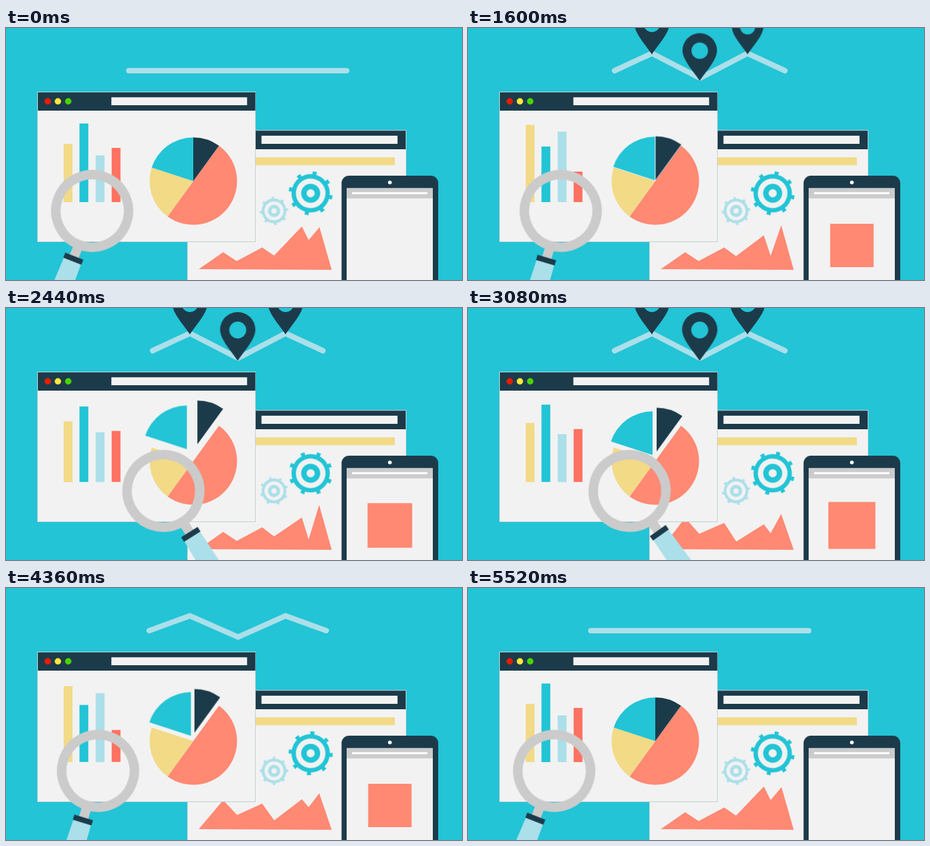
Write an HTML page that moves like this. It is 672 px wide and 372 px high and loops after 5.56 s.

```html
<!DOCTYPE html>
<html lang="en">
<head>
<meta charset="utf-8">
<title>Analytics dashboard</title>
<style>
:root {
  --loop: 5560ms;
  --teal: #22c4d6;
  --dark: #1c3b4a;
  --paper: #f2f2f2;
  --sand: #f2da87;
  --coral: #ff8973;
  --red: #ff7160;
  --ice: #abdfe9;
  --grey: #cbcbcb;
  --cubic: cubic-bezier(.65, 0, .35, 1);
  --quart: cubic-bezier(.76, 0, .24, 1);
  --quad: cubic-bezier(.45, 0, .55, 1);
  --back-out: cubic-bezier(.333, 1.7, .667, 1);
  --back-in: cubic-bezier(.333, 0, .667, -.7);
}
html, body { margin: 0; width: 100%; height: 100%; overflow: hidden; background: var(--teal); }
svg { display: block; width: 672px; height: 372px; }

.teal { fill: var(--teal); }
.dark { fill: var(--dark); }
.paper { fill: var(--paper); }
.sand { fill: var(--sand); }
.coral { fill: var(--coral); }
.red { fill: var(--red); }
.ice { fill: var(--ice); }
.grey { fill: var(--grey); }
.frame { fill: var(--paper); stroke: #c5d0d2; stroke-width: 1; }

.move { animation: var(--loop) var(--cubic) infinite; }

/* Route line */
.route {
  fill: none; stroke: var(--ice); stroke-width: 8;
  stroke-linecap: round; stroke-linejoin: miter;
  animation-name: route;
}
@keyframes route {
  0%, 7.55%, 91.73%, 100% { d: path("M181 63L271 63L342 63L412 63L502 63"); }
  19.42%, 71.94% { d: path("M216 63L271 37.5L342 74L412 37.5L467 63"); }
}

/* Map pins */
.pin { animation-timing-function: linear; }
.pin-a { animation-name: pin-a; }
.pin-b { animation-name: pin-b; }
.pin-c { animation-name: pin-c; }
@keyframes pin-a {
  0%, 79.55%, 100% { transform: scale(0); }
  17.21% { transform: scale(0); animation-timing-function: var(--back-out); }
  28.81% { transform: scale(1); }
  67.95% { transform: scale(1); animation-timing-function: var(--back-in); }
}
@keyframes pin-b {
  0%, 77.34%, 100% { transform: scale(0); }
  19.42% { transform: scale(0); animation-timing-function: var(--back-out); }
  31.03% { transform: scale(1); }
  65.74% { transform: scale(1); animation-timing-function: var(--back-in); }
}
@keyframes pin-c {
  0%, 75.14%, 100% { transform: scale(0); }
  21.64% { transform: scale(0); animation-timing-function: var(--back-out); }
  33.24% { transform: scale(1); }
  63.54% { transform: scale(1); animation-timing-function: var(--back-in); }
}

/* Bars stretch from the baseline; gears swing on the same beat */
.bar { transform-origin: 0 257px; animation-name: bar; }
@keyframes bar {
  0%, 6.12%, 50.72%, 94.96%, 100% { transform: scaleY(1); }
  28.06%, 29.14%, 72.66%, 73.02% { transform: scaleY(var(--to)); }
}
.gear { animation-name: gear; }
@keyframes gear {
  0%, 6.12%, 50.72%, 94.96%, 100% { transform: rotate(var(--from)); }
  28.06%, 29.14%, 72.66%, 73.02% { transform: rotate(var(--to)); }
}

/* Pie slices: --far is the widest gap, --near the resting gap */
.slice { animation-name: slice; }
@keyframes slice {
  0%, 25.18%, 89.21%, 100% { transform: translate(0, 0); }
  40.29% { transform: translate(var(--far-x), var(--far-y)); }
  53.24%, 73.38% { transform: translate(var(--near-x), var(--near-y)); }
}

/* Area graph */
.area { animation-name: area; animation-timing-function: var(--quad); }
@keyframes area {
  0%, 100% { d: path("M284 356L320 331L340 344L377.5 324L395 336L436 293L446 313L462 294L480 357Z"); }
  41.73% { d: path("M284 356L320 331L340 344L377.5 324L395 337L436 309L446 342L461.5 290.5L480 357Z"); }
  62.59% { d: path("M284 356L320 303L341 330L377.5 315L395.5 347L436 322.5L446 329.5L461.5 308.3L480 357Z"); }
}

/* Phone badge */
.badge { animation-name: badge; }
@keyframes badge {
  0%, 3.24%, 90.65%, 100% { transform: scale(0); }
  15.83%, 38.85%, 63.31%, 80.58% { transform: scale(1); }
  51.08% { transform: scale(1.1); }
}

/* Magnifier */
.lens { animation-name: lens; animation-timing-function: var(--quart); }
@keyframes lens {
  0%, 18.35%, 88.85%, 100% { transform: translate(127px, 270px) rotate(21.5deg); }
  52.88% { transform: translate(238.5px, 270px) rotate(-35.5deg); }
}
</style>
</head>
<body>
<svg viewBox="0 0 672 372" aria-hidden="true">
  <defs>
    <g id="pin">
      <path class="dark" d="M0 0C-8 -13 -26 -31 -26 -46A26 26 0 0 1 26 -46C26 -31 8 -13 0 0Z"/>
      <circle class="teal" cy="-45.5" r="12.5"/>
    </g>
    <g id="gear" fill="none" stroke="currentColor">
      <circle r="25" stroke-width="6.4"/>
      <circle r="10" stroke-width="8"/>
      <circle r="29.8" stroke-width="5.2" pathLength="360" stroke-dasharray="11.5 33.5" stroke-dashoffset="5.75"/>
    </g>
  </defs>

  <rect class="teal" width="672" height="372"/>

  <path class="move route" d="M181 63L271 63L342 63L412 63L502 63"/>
  <g transform="translate(271 39)"><use href="#pin" class="move pin pin-a"/></g>
  <g transform="translate(412 39)"><use href="#pin" class="move pin pin-c"/></g>
  <g transform="translate(341.5 78)"><use href="#pin" class="move pin pin-b"/></g>

  <!-- Back window -->
  <rect class="frame" x="267.5" y="151" width="322" height="230"/>
  <rect class="dark" x="268" y="151.5" width="321" height="27.5"/>
  <rect class="paper" x="376.5" y="159" width="200.5" height="12"/>
  <rect class="sand" x="290" y="191" width="283" height="11.5"/>
  <path class="move area coral" d="M284 356L320 331L340 344L377.5 324L395 336L436 293L446 313L462 294L480 357Z"/>
  <g transform="translate(449 244)" color="#22c4d6">
    <use href="#gear" class="move gear" style="--from:11deg;--to:101deg"/>
  </g>
  <g transform="translate(395 270) scale(.645)" color="#abdfe9">
    <use href="#gear" class="move gear" style="--from:-7deg;--to:-97deg"/>
  </g>

  <!-- Phone -->
  <rect class="dark" x="494.5" y="218" width="142.5" height="180" rx="11"/>
  <rect class="paper" x="502" y="236.5" width="127" height="140"/>
  <rect class="grey" x="502" y="236.5" width="127" height="15"/>
  <rect x="510" y="242.3" width="111" height="3" fill="#fff"/>
  <circle cx="565.7" cy="228" r="2.8" fill="#fff"/>
  <g transform="translate(565.7 321)">
    <rect class="move badge coral" x="-32" y="-32" width="64" height="64"/>
  </g>

  <!-- Front window -->
  <rect class="frame" x="46.5" y="94.5" width="321" height="221"/>
  <rect class="dark" x="47" y="95" width="320.5" height="27"/>
  <circle cx="61.5" cy="108.3" r="4.7" fill="#e91d02"/>
  <circle cx="76.5" cy="108.3" r="4.7" fill="#ffe93b"/>
  <circle cx="91.7" cy="108.3" r="4.7" fill="#4ad500"/>
  <rect class="paper" x="155.3" y="102.3" width="200" height="11.7"/>

  <rect class="move bar sand" x="85" y="171" width="13" height="86" style="--to:1.326"/>
  <rect class="move bar teal" x="108.3" y="141" width="13" height="116" style="--to:.707"/>
  <rect class="move bar ice" x="132.2" y="188" width="13" height="69" style="--to:1.507"/>
  <rect class="move bar red" x="155.7" y="177" width="13" height="80" style="--to:.5625"/>

  <path class="coral" d="M276 226L313.9 173.8A64.5 64.5 0 0 1 238.1 278.2Z"/>
  <path class="sand" d="M276 226L238.1 278.2A64.5 64.5 0 0 1 214.7 206.1Z"/>
  <path class="move slice teal" d="M276 226L214.7 206.1A64.5 64.5 0 0 1 276 161.5Z"
    style="--far-x:-10px;--far-y:-18.5px;--near-x:-4px;--near-y:-9px"/>
  <path class="move slice dark" d="M276 226V161.5A64.5 64.5 0 0 1 313.9 173.8Z"
    style="--far-x:6.5px;--far-y:-26px;--near-x:2px;--near-y:-14.3px"/>

  <!-- Magnifier -->
  <g class="move lens">
    <rect class="grey" x="-7" y="57" width="14" height="17"/>
    <path class="ice" d="M-13.5 78H13.5L16 175H-16Z"/>
    <rect class="dark" x="-14.3" y="71.8" width="28.6" height="8"/>
    <circle r="53.5" fill="none" stroke="#cbcbcb" stroke-width="14"/>
  </g>
</svg>
</body>
</html>
```
